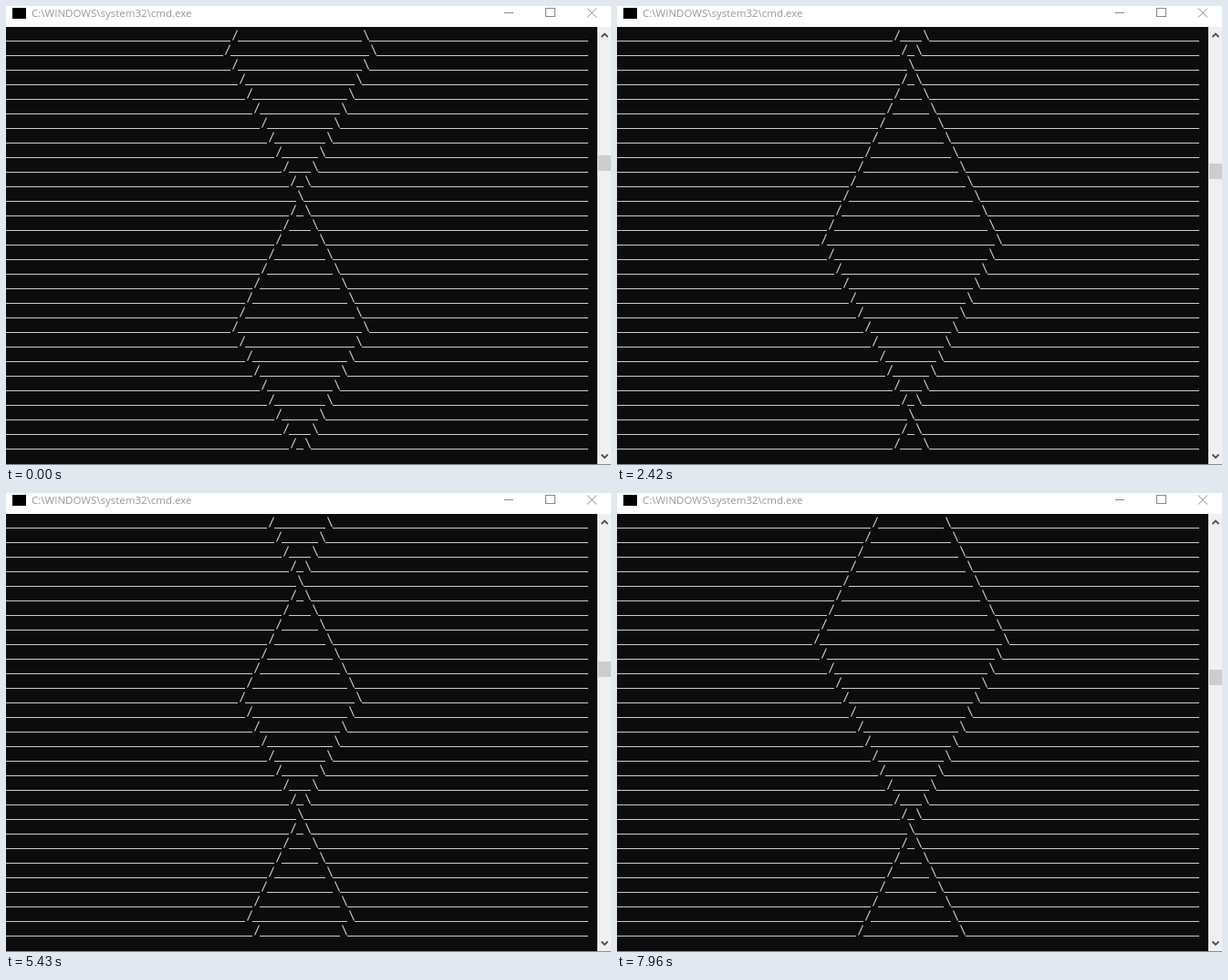
These frames come from a looping animation (663 px wide and 504 px high, 8 s). An HTML page:

```html
<!DOCTYPE html>
<html lang="en">
<head>
<meta charset="utf-8">
<title>Console</title>
<style>
  html, body { margin: 0; width: 100%; height: 100%; overflow: hidden; background: #fff; }
  svg { display: block; width: 100%; height: 100%; }
  text { font: 11.5px "Open Sans", "Noto Sans", sans-serif; fill: #999; white-space: pre; }
</style>
</head>
<body>
<svg viewBox="0 0 663 504" fill="none">
  <rect width="663" height="504" fill="#fff"/>
  <rect x="7" y="2" width="15" height="12" fill="#000"/>
  <text x="28" y="12">C:\WINDOWS\system32\cmd.exe</text>
  <g stroke="#8a8a8a">
    <path d="M546 7.5H556M591.5 2.5H601.5V11.5H591.5Z" shape-rendering="crispEdges"/>
    <path d="M637 2.5L647 12.5M647 2.5L637 12.5"/>
  </g>
  <rect y="23" width="648" height="480" fill="#0c0c0c"/>
  <rect x="648" y="23" width="15" height="480" fill="#f0f0f0"/>
  <rect y="503" width="663" height="1" fill="#8c8c8c"/>
  <path d="M652.5 34L656 30.5L659.5 34M652.5 492.5L656 496L659.5 492.5" stroke="#505050" stroke-width="1.8"/>
  <rect id="thumb" x="649" width="14" height="17" fill="#cdcdcd"/>
  <path id="dashes" stroke="#ccc" shape-rendering="crispEdges"/>
  <path id="slashes" stroke="#ccc" stroke-width="1.1"/>
</svg>
<script>
const LOOP = 8000, ROWS = 29, ROW_H = 16, CELL = 8, MID = 40, TOP = 26, FIRST = 9;
const MIN_PEAK = 4, MAX_PEAK = 15;

// Half-width of every printed line: diamonds whose size swings between the two limits.
const widths = [];
for (let peak = 10, dir = -1; widths.length < 800; peak += dir) {
  for (let i = 0; i < 2 * peak; i++) widths.push(peak - Math.abs(peak - i));
  if (peak === MIN_PEAK) dir = 1;
  if (peak === MAX_PEAK) dir = -1;
}

// Screen refreshes: bursts of 18, each given by its first and last time.
const bursts = [[30, 790], [840, 1630], [1690, 2470], [2500, 3290], [3340, 4130],
  [4180, 4950], [5000, 5790], [5840, 6630], [6660, 7450], [7500, 8282]];
const refreshes = bursts.flatMap(([a, b]) =>
  Array.from({ length: 18 }, (_, j) => Math.floor((a + (b - a) * j / 17) / 10) * 10));

// Lines scrolled at given times.
const pace = [[-16, 0], [1530, 128], [2420, 199], [3620, 297], [4640, 380], [6250, 510], [7960, 648]];

function scrolled(t) {
  if (t < refreshes[0]) return 0;
  const at = refreshes.filter(r => r <= t).pop();
  const k = Math.max(1, pace.findIndex(p => p[0] >= at));
  const [t0, n0] = pace[k - 1], [t1, n1] = pace[k];
  return Math.floor(n0 + (n1 - n0) * (at - t0) / (t1 - t0) + 0.9);
}

const [thumb, dashes, slashes] = ["thumb", "dashes", "slashes"].map(id => document.getElementById(id));
let shown = -1;

function draw(t) {
  const n = scrolled(t);
  if (n === shown) return;
  shown = n;
  let lines = "", marks = "";
  for (let i = 0; i < ROWS; i++) {
    const w = widths[FIRST + n + i], y = TOP + i * ROW_H;
    const left = (MID - w) * CELL, right = (MID + w) * CELL;
    lines += `M0 ${y + 12.5}H${left - 2}`;
    if (w) {
      lines += `M${left + 6} ${y + 12.5}H${right - 2}`;
      marks += `M${left + 0.5} ${y + 11.5}L${left + 5.5} ${y + 0.5}`;
    }
    lines += `M${right + 6} ${y + 12.5}H638`;
    marks += `M${right + 0.5} ${y + 0.5}L${right + 5.5} ${y + 11.5}`;
  }
  dashes.setAttribute("d", lines);
  slashes.setAttribute("d", marks);
  thumb.setAttribute("y", 164 + Math.round(n * 0.0463));
}

const start = performance.now();
function tick() {
  draw((performance.now() - start) % LOOP);
  requestAnimationFrame(tick);
}
tick();
</script>
</body>
</html>
```
